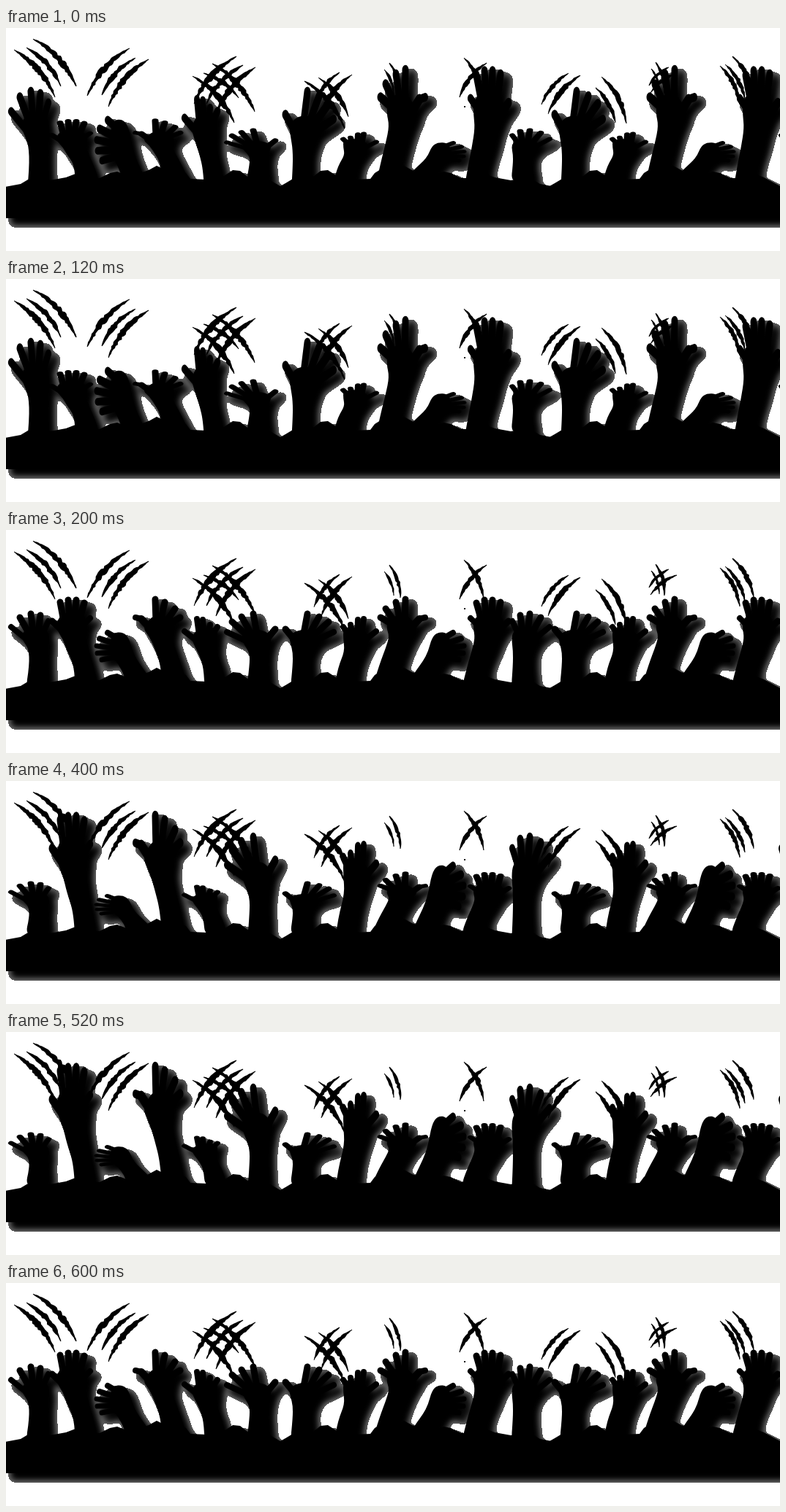
An HTML page with a canvas that plays this animation: 1058x306 px, repeating every 0.8 s.

```html
<!DOCTYPE html>
<html lang="en">
<head>
<meta charset="utf-8">
<title>Rising hands</title>
<style>
  html, body { margin: 0; width: 100%; height: 100%; overflow: hidden; background: #fff; }
  canvas { display: block; }
</style>
</head>
<body>
<canvas id="stage" width="1058" height="306"></canvas>
<script>
const W = 1058, H = 306, PAD = 60;
const STEP = 200, PIVOT = 190;
const stage = document.getElementById('stage').getContext('2d');

// Each hand: fingers as [tip x, tip y, root x, root y, width], and palm + arm outline.
const HANDS = [
  {
    fingers: [[412, 115, 407, 142, 9], [428, 119, 414, 144, 9], [441, 126, 418, 147, 9],
              [448, 140, 422, 152, 8], [382, 136, 397, 154, 9]],
    arm: [387, 146, 398, 137, 419, 137, 429, 147, 424, 158, 417, 169, 417, 185, 422, 225,
          388, 225, 392, 185, 392, 168, 389, 156]
  },
  {
    fingers: [[461, 133, 470, 146, 8], [471, 130, 474, 146, 8], [481, 123, 480, 144, 8],
              [489, 122, 486, 144, 8], [506, 139, 488, 153, 8]],
    arm: [461, 136, 472, 133, 488, 136, 497, 147, 492, 160, 486, 171, 480, 188, 478, 225,
          447, 225, 454, 188, 463, 166, 461, 150]
  },
  {
    fingers: [[512, 120, 531, 131, 9], [519, 108, 533, 129, 9], [533, 99, 539, 126, 9],
              [546, 95, 545, 126, 9], [573, 120, 565, 122, 8], [565, 122, 550, 138, 10]],
    arm: [523, 124, 532, 117, 548, 117, 559, 128, 562, 136, 553, 148, 547, 162, 539, 183,
          535, 225, 498, 225, 511, 183, 519, 162, 524, 146, 520, 134]
  },
  {
    fingers: [[611, 141, 592, 152, 8], [622, 149, 598, 157, 8], [626, 159, 598, 163, 7],
              [625, 169, 600, 168, 7], [619, 178, 598, 174, 7]],
    arm: [582, 148, 590, 140, 604, 141, 609, 158, 606, 172, 597, 183, 588, 200, 583, 225,
          540, 225, 561, 192, 570, 180, 577, 167]
  },
  {
    fingers: [[635, 121, 648, 134, 8], [643, 100, 651, 128, 9], [654, 96, 657, 124, 9],
              [665, 96, 663, 124, 9], [676, 99, 671, 126, 9], [687, 125, 671, 140, 9]],
    arm: [639, 125, 648, 115, 672, 113, 681, 126, 680, 138, 672, 150, 667, 165, 657, 185,
          655, 225, 621, 225, 631, 185, 637, 165, 641, 148, 639, 136]
  },
  {
    fingers: [[692, 125, 702, 146, 8], [703, 117, 706, 142, 9], [716, 115, 713, 140, 9],
              [731, 120, 718, 143, 9], [743, 133, 722, 150, 8]],
    arm: [693, 140, 701, 134, 717, 133, 729, 142, 727, 152, 719, 163, 718, 185, 724, 225,
          690, 225, 693, 185, 693, 165, 691, 150]
  }
];

const HILLS = [[375, 217], [382, 213], [392, 207], [405, 201], [420, 204], [430, 196],
  [440, 195], [452, 203], [475, 208], [498, 207], [504, 199], [512, 194], [530, 196],
  [544, 189], [555, 195], [575, 202], [583, 203], [598, 197], [608, 199], [622, 206],
  [640, 206], [655, 200], [668, 205], [690, 209], [715, 205], [730, 214], [751, 218]];

// Claw strokes: [top x, top y, bottom x, bottom y]
const CLAWS = [
  [11, 30, 67, 95], [28, 27, 75, 80], [37, 15, 96, 80],
  [169, 28, 111, 93], [177, 41, 131, 92], [195, 43, 140, 108],
  [315, 39, 257, 104], [324, 51, 274, 104], [341, 54, 287, 118],
  [255, 66, 312, 130], [270, 62, 318, 96], [282, 49, 340, 115],
  [456, 61, 421, 106], [473, 64, 431, 118],
  [408, 73, 463, 138], [427, 68, 468, 122],
  [517, 57, 530, 90], [524, 48, 539, 93],
  [626, 41, 653, 95], [657, 48, 620, 95],
  [769, 62, 732, 105], [785, 65, 741, 118],
  [806, 82, 833, 130], [814, 67, 848, 131],
  [888, 47, 900, 90], [882, 56, 893, 88], [906, 54, 879, 79], [917, 62, 881, 89],
  [976, 52, 1003, 105], [983, 50, 1010, 98], [993, 39, 1022, 93]
];

const MID = { scale: 1, drop: 0 };
const LOW = { scale: 0.66, drop: 0 };
const POSES = [
  [{ scale: 1.5, drop: 10 }, MID, LOW, MID],
  [LOW, MID, { scale: 1.5, drop: 0 }, MID]
];

function layer() {
  const c = document.createElement('canvas');
  c.width = W + PAD;
  c.height = H;
  return c.getContext('2d', { willReadFrequently: true });
}

function smooth(ctx, p) {
  const n = p.length / 2;
  const at = i => [p[(i % n) * 2], p[(i % n) * 2 + 1]];
  const half = i => at(i).map((v, k) => (v + at(i + 1)[k]) / 2);
  ctx.beginPath();
  ctx.moveTo(...half(n - 1));
  for (let i = 0; i < n; i++) ctx.quadraticCurveTo(...at(i), ...half(i));
  ctx.fill();
}

function drawHand(ctx, hand, pose) {
  ctx.save();
  ctx.translate(0, PIVOT + pose.drop);
  ctx.scale(1, pose.scale);
  ctx.translate(0, -PIVOT);
  smooth(ctx, hand.arm);
  ctx.lineCap = 'round';
  for (const [x, y, rx, ry, w] of hand.fingers) {
    ctx.lineWidth = w;
    ctx.beginPath();
    ctx.moveTo(x, y);
    ctx.lineTo(rx, ry);
    ctx.stroke();
  }
  ctx.restore();
}

function drawGround(ctx, hills) {
  ctx.beginPath();
  hills.forEach(([x, y]) => ctx.lineTo(x, y));
  ctx.lineTo(hills[hills.length - 1][0], 261);
  ctx.lineTo(hills[0][0], 261);
  ctx.fill();
}

function drawTile(ctx, step, dx, flip, hills = HILLS) {
  ctx.save();
  ctx.translate(dx, 0);
  if (flip) ctx.scale(-1, 1);
  HANDS.forEach((hand, i) => drawHand(ctx, hand, POSES[(i + flip) % 2][step]));
  drawGround(ctx, hills);
  ctx.restore();
}

// Soft shadow cut off with a hard rim, black turning grey outwards.
function castShadow(mask) {
  const ctx = layer();
  ctx.filter = 'blur(4px)';
  ctx.drawImage(mask.canvas, 8, 8);
  ctx.filter = 'none';
  const img = ctx.getImageData(0, 0, W + PAD, H), d = img.data;
  for (let i = 0; i < d.length; i += 4) {
    const a = d[i + 3] / 255;
    d[i] = d[i + 1] = d[i + 2] = 110 * Math.pow(1 - a, 1.5);
    d[i + 3] = a > 0.11 ? 255 : 0;
  }
  ctx.putImageData(img, 0, 0);
  return ctx.canvas;
}

function drawClaws(ctx) {
  let seed = 7;
  const rand = () => (seed = (seed * 16807) % 2147483647) / 2147483647;
  for (const [x0, y0, x1, y1] of CLAWS) {
    const dx = x1 - x0, dy = y1 - y0, len = Math.hypot(dx, dy);
    const side = Math.sign(dx);
    const cx = (x0 + x1) / 2 + side * dy * 0.17, cy = (y0 + y1) / 2 - side * dx * 0.17;
    const width = Math.min(3.6, len / 22);
    const left = [], right = [], n = Math.round(len / 3);
    for (let i = 0; i <= n; i++) {
      const t = i / n, s = 1 - t;
      const x = s * s * x0 + 2 * s * t * cx + t * t * x1;
      const y = s * s * y0 + 2 * s * t * cy + t * t * y1;
      const tx = s * (cx - x0) + t * (x1 - cx), ty = s * (cy - y0) + t * (y1 - cy);
      const k = (0.5 + width * Math.sin(Math.PI * t)) / Math.hypot(tx, ty);
      const a = k * (0.6 + 0.7 * rand()), b = k * (0.6 + 0.7 * rand());
      left.push([x - ty * a, y + tx * a]);
      right.unshift([x + ty * b, y - tx * b]);
    }
    ctx.beginPath();
    left.concat(right).forEach(p => ctx.lineTo(...p));
    ctx.fill();
  }
  ctx.fillRect(626, 107, 2, 2);
}

function render(step) {
  const mask = layer();
  drawTile(mask, step, 750, 1);
  drawTile(mask, step, 0, 0);
  drawTile(mask, step, 368, 0, HILLS.slice(0, 23).concat([[690, 217], [750, 218]]));
  const out = layer();
  out.fillStyle = '#fff';
  out.fillRect(0, 0, W + PAD, H);
  out.drawImage(castShadow(mask), 0, 0);
  out.drawImage(mask.canvas, 0, 0);
  out.fillStyle = '#000';
  drawClaws(out);
  return out.canvas;
}

const views = [0, 1, 2].map(render);
views.push(views[1]);

const start = performance.now();
function tick() {
  const t = Math.max(0, performance.now() - start);
  stage.drawImage(views[Math.floor(t / STEP) % 4], 0, 0);
  requestAnimationFrame(tick);
}
tick();
</script>
</body>
</html>
```
